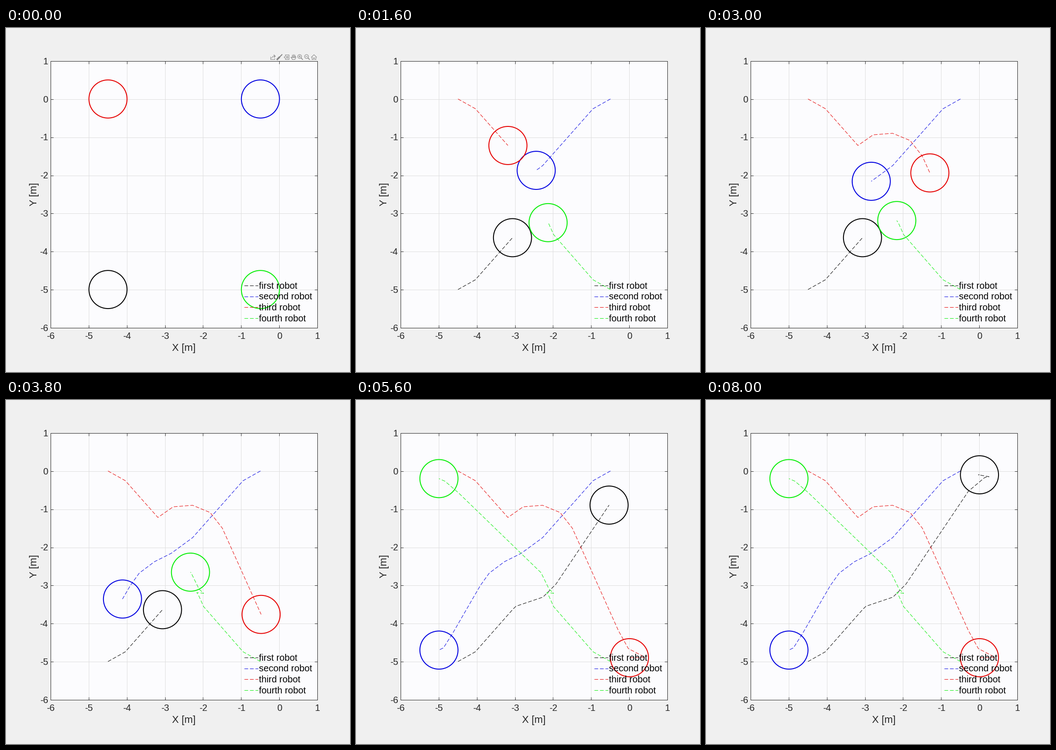
Recreate the animation shown at these times as a matplotlib script. Size 748 by 748 pixels, loop 8.2 s.

```python
import numpy as np
import matplotlib.pyplot as plt
from matplotlib.animation import FuncAnimation
from matplotlib.patches import Circle
from matplotlib.transforms import Affine2D

plt.rcParams["font.family"] = "Liberation Sans"

SIZE, DPI = 748, 100
PX = 72 / DPI                       # one pixel in points
LEFT, LOW, SIDE = 97, 96, 580       # plot box, from the lower left corner
INK, GRAY = "#262626", "#858585"
FRAMES, INTERVAL = 41, 200
TOOLBAR_FRAMES = (0, 38, 39)
STRIDE, RADIUS = 0.5, 0.5           # metres per step, metres
CENTRE = np.array([-2.5, -2.5])
FIRST_STEP = np.array([0.455, 0.255])

# name, colour, start, turning points in metres, and the steps at which
# robots that get in each other's way pass a given point of their route
ROBOTS = [
    ("first robot", "#000000", (-4.5, -5),
     [(-3.07, -3.64), (-2.98, -3.55), (-2.27, -3.31), (-1.93, -2.97),
      (-0.29, -0.53), (0.14, -0.17), (0.25, -0.15), (-0.03, -0.1), (0, -0.1)],
     [(2, 4), (2, 19), (5, 23)]),
    ("second robot", "#0000e0", (-0.5, 0),
     [(-2.28, -1.75), (-2.84, -2.16), (-3.28, -2.38), (-3.68, -2.68),
      (-3.91, -3), (-4.12, -3.36), (-4.64, -4.26), (-4.88, -4.64), (-5, -4.7)],
     [(2, 5), (3, 15), (5, 17), (7, 19)]),
    ("third robot", "#e60000", (-4.5, 0),
     [(-3.19, -1.22), (-2.79, -0.94), (-2.28, -0.9), (-1.82, -1.09),
      (-1.5, -1.5), (-0.29, -4.19), (-0.03, -4.66), (0.41, -4.89), (0, -4.9)],
     [(2, 4.3), (2, 10)]),
    ("fourth robot", "#08ee08", (-0.5, -5),
     [(-1.99, -3.56), (-2.12, -3.27), (-2.17, -3.19), (-1.99, -3.21),
      (-2.11, -3.1), (-2.32, -2.67), (-4.48, -0.58), (-4.84, -0.27), (-5, -0.2)],
     [(3, 4.8), (4, 15), (6, 18)]),
]

fig = plt.figure(figsize=(SIZE / DPI, SIZE / DPI), dpi=DPI, facecolor="#f0f0f0")

plot = fig.add_axes([LEFT / SIZE, LOW / SIZE, SIDE / SIZE, SIDE / SIZE],
                    facecolor="#fcfcfe")
plot.set(xlim=(-6, 1), ylim=(-6, 1), xticks=range(-6, 2), yticks=range(-6, 2))
plot.set_axisbelow(True)
plot.grid(color="#dedede", lw=PX)
plot.tick_params(direction="in", top=True, right=True, length=6 * PX, width=PX,
                 color=INK, labelbottom=False, labelleft=False)
for spine in plot.spines.values():
    spine.set(color=INK, lw=PX)
# unsnapped shapes aim at pixel centres, where snapped lines land
metres = plot.transData + Affine2D().translate(0.5, 0.5)

# overlay in stage pixels, y downwards
stage = fig.add_axes([0, 0, 1, 1], zorder=2)
stage.set(xlim=(0, SIZE), ylim=(SIZE, 0))
stage.axis("off")


def label(x, y, text, size=20, color=INK, **kw):
    stage.text(x, y, text, fontsize=size * PX, color=color, va="baseline", **kw)


def dashed(ax, x, y, color, **kw):
    return ax.plot(x, y, color=color, lw=PX, ls=(0, (8, 4)), **kw)[0]


def draw_labels():
    for i in range(8):
        offset = i * SIDE / 7
        label(LEFT + 0.5 + offset, 676, str(i - 6), ha="center")
        label(91.5, 658.7 - offset, str(i - 6), ha="right")
    label(387, 702, "X [m]", 22, ha="center")
    label(67, 361.5, "Y [m]", 22, ha="center", rotation=90, rotation_mode="anchor")
    for i, (name, color, *_) in enumerate(ROBOTS):
        y = 560 + 23.6 * i
        dashed(stage, [518, 548], [y, y], color)
        label(550, y + 6.8, name, color="black")


def draw_toolbar():
    parts = []

    def stroke(x, y, *moves, width=1):
        path = np.cumsum([(x, y), *moves], axis=0)
        parts.extend(stage.plot(*path.T, color=GRAY, lw=width * PX, snap=False))

    # export, brush, data tip
    stroke(575.5, 63, (0, 5.5), (9, 0), (0, -2))
    stroke(577.5, 65.5, (3, -4), (5, 0), (-3, -3), (3, 3), (-3, 3))
    stroke(600, 58, (-6, 6), width=2)
    stroke(594, 64, (-4, 4), width=3.5)
    stroke(607.5, 58.5, (8, 0), (0, 10), (-8, 0), (0, -3), (-3, -2), (3, -2), (0, -3))
    for y in (61.5, 63.5, 65.5):
        stroke(609.5, y, (4, 0))
    # hand
    stroke(623, 68.5, (-3.5, -5), (3, 0.5), (5, 0), (2.5, -2), (0, 3), (-2, 3.5), (-5, 0))
    for k in range(4):
        stroke(622.5 + 2 * k, 64, (0, -5 - (k in (1, 2))))
    # zoom in, zoom out
    for x in (638.5, 653.5):
        parts.append(stage.add_patch(Circle((x, 62), 4.2, fc="none", ec=GRAY, lw=PX)))
        stroke(x + 3, 65, (3.5, 3.5), width=1.5)
        stroke(x - 2, 62, (4, 0))
    stroke(638.5, 60, (0, 4))
    # home
    stroke(664, 63.5, (5.7, -5.5), (5.7, 5.5))
    stroke(665.5, 63, (0, 5.5), (3, 0), (0, -3.5), (2.5, 0), (0, 3.5), (3, 0), (0, -5.5))
    return parts


class Robot:
    def __init__(self, color, start, turns, passes):
        start = np.array(start)
        first = start + np.sign(CENTRE - start) * FIRST_STEP
        self.route = np.array([start, first, *turns])
        legs = np.hypot(*np.diff(self.route, axis=0).T)
        self.arc = np.concatenate([[0], np.cumsum(legs)])
        # after the last timed point the robot strides on to its goal
        point, step = passes[-1]
        arrival = step + (self.arc[-1] - self.arc[point]) / STRIDE
        self.steps = [0, *(s for _, s in passes), arrival]
        self.walked = [0, *(self.arc[p] for p, _ in passes), self.arc[-1]]
        self.trail = dashed(plot, [], [], color, transform=metres, zorder=3)
        self.body = plot.add_patch(Circle(start, RADIUS, fc="none", ec=color,
                                          lw=2 * PX, transform=metres, zorder=4))

    def move(self, step):
        s = np.interp(step, self.steps, self.walked)
        here = [np.interp(s, self.arc, axis) for axis in self.route.T]
        self.trail.set_data(*np.vstack([self.route[self.arc < s], here]).T)
        # the patch keeps its own scaling on top of the shifted data transform
        self.body.center = here


draw_labels()
toolbar = draw_toolbar()
robots = [Robot(*spec[1:]) for spec in ROBOTS]


def update(n):
    for robot in robots:
        robot.move(n)
    for part in toolbar:
        part.set_visible(n in TOOLBAR_FRAMES)
    return []


anim = FuncAnimation(fig, update, frames=FRAMES, interval=INTERVAL,
                     repeat=True, repeat_delay=0)
plt.show()
```
